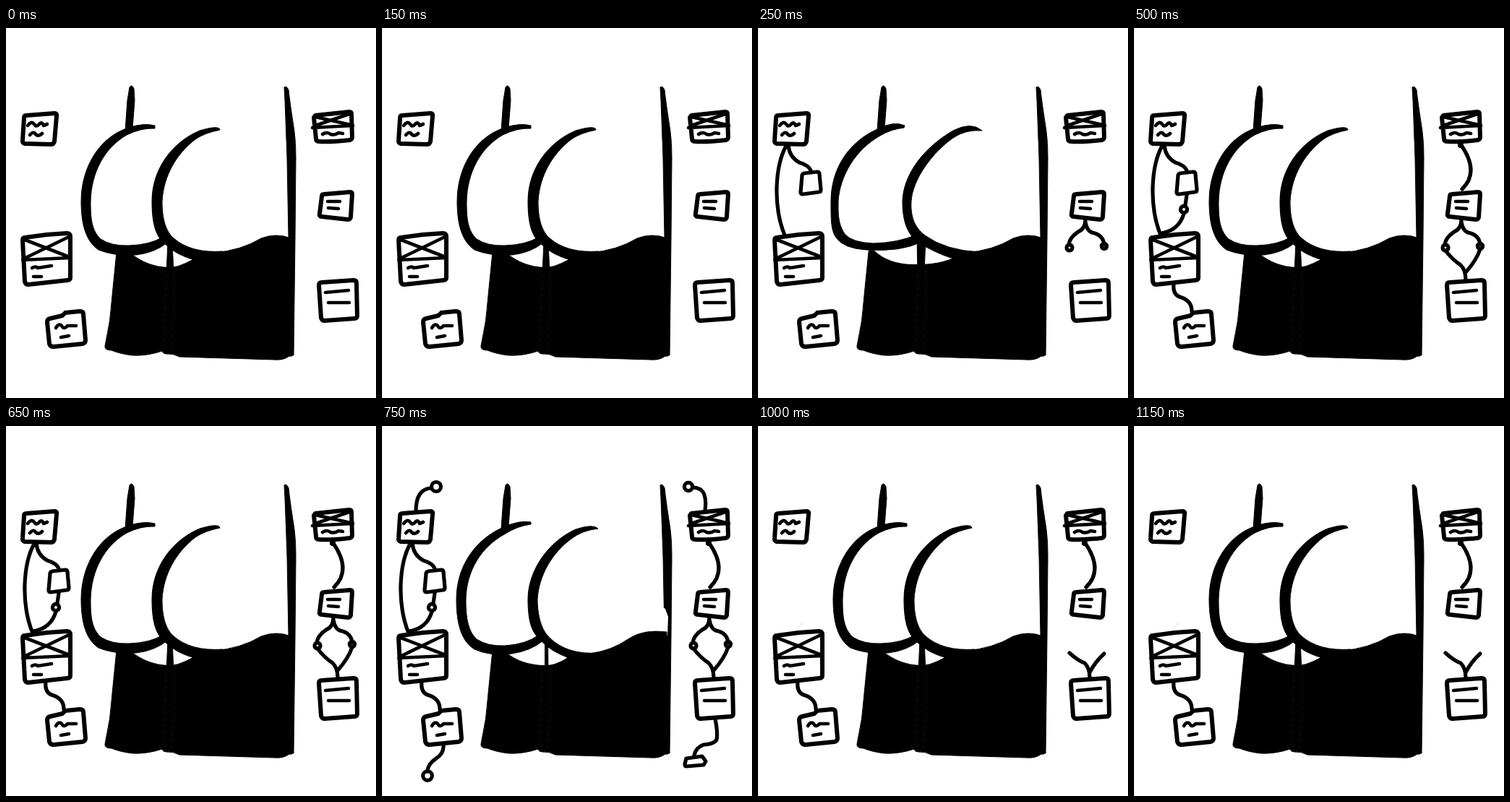
Animation, 512 px wide and 512 px high, one loop 1.25 s. Source, as an HTML page:

```html
<!DOCTYPE html>
<html lang="en">
<head>
<meta charset="utf-8">
<title>Sketch loop</title>
<style>
  html, body { margin: 0; width: 100%; height: 100%; overflow: hidden; background: #fff; }
  svg { display: block; width: 100%; height: 100%; }
  .brush { stroke: #000; stroke-width: 1; stroke-linejoin: round; }
  .gap { fill: #fff; stroke: none; }
  .ink { fill: none; stroke: #000; stroke-width: 5.2; stroke-linecap: round; stroke-linejoin: round; }
  .thin { stroke-width: 4.6; }
  .box { stroke-width: 6; }
</style>
</head>
<body>
<svg viewBox="0 0 512 512">
  <g class="brush">
    <!-- torso and skirt -->
    <path d="M171 82Q174 77 177 84L178 100L175 139L165 142L168 100Z"/>
    <path d="M385 82Q388 79 391 86Q393 104 397 130Q401 152 401 180L400 290L398 453L390 452L391 290L389 180L386 100Z"/>
    <path d="M155 305L180 309L222 294L262 318H398L397 450Q398 455 392 454Q384 460 372 459L240 455Q231 450 222 451Q217 451 216 447Q195 454 175 453Q158 451 146 446Q136 446 137 440Q145 405 147 370Q150 340 153 310Z"/>
    <path d="M221 340L219 446M233 334L232 400L228 446" fill="none" stroke="#222" stroke-width=".6" stroke-dasharray="5 4"/>

    <!-- three poses of the curves -->
    <path data-on="0124" d="M262 320L287 311Q325 308 353 291Q375 283 394 291V320Z"/>
    <g data-on="024">
      <path class="gap" d="M172 311Q195 330 226 331Q240 331 260 319L222 294Z"/>
      <path d="M206 135Q190 131 170 138C130 150 104 192 104 240C104 275 112 296 128 307Q150 316 180 314Q206 311 223 297L217 289Q200 300 170 301Q146 302 131 292C118 280 117 262 117 240C118 200 136 166 167 148Q187 138 206 139Z"/>
      <path d="M296 141Q295 134 268 142C230 158 202 195 202 240C202 270 207 287 218 297Q235 315 265 322L300 317L300 309Q255 312 231 290C218 278 216 255 216 240C218 205 235 175 262 154Q275 145 296 141Z"/>
      <path d="M224 296L230 296L232 340L222 340Z"/>
    </g>
    <g data-on="1">
      <path class="gap" d="M160 307Q180 327 216 327Q247 328 271 318L224 290Z"/>
      <path d="M203 135Q188 128 165 140C125 158 101 195 101 240C101 266 101 280 108 290Q118 305 150 307Q198 310 226 296L219 286Q195 297 160 298Q130 297 120 285C110 270 111 255 111 240C113 205 135 168 169 149Q184 140 202 138Z"/>
      <path d="M310 142Q295 129 270 142C230 165 201 202 200 240C200 268 207 286 222 297Q247 312 270 319L300 318L307 310Q260 308 231 287C215 275 211 258 212 240C214 208 243 171 270 152Q288 140 310 142Z"/>
      <path d="M220 290Q227 283 232 290L230 340L221 340Z"/>
    </g>
    <g data-on="3">
      <path class="gap" d="M388 250L392 253L396 264L395 290L388 290Z"/>
      <path d="M262 322L287 315Q318 311 342 294Q362 281 394 285V320Z"/>
      <path class="gap" d="M170 312Q193 331 226 331Q240 331 256 321L222 294Z"/>
      <path d="M206 133Q190 130 168 140C129 157 103 194 103 240C103 274 110 298 128 309Q150 319 180 315Q206 311 223 297L217 289Q200 302 170 304Q146 305 131 295C118 283 116 262 116 240C117 200 137 168 169 150Q188 138 206 136Z"/>
      <path d="M299 142Q292 135 268 143C230 160 202 200 202 240C202 270 207 285 218 295Q233 313 265 323L300 320V314Q255 317 231 292C218 280 215 255 215 240C217 207 235 176 262 156Q278 144 299 142Z"/>
      <path d="M225.5 296L229.5 296L230 340L225.5 340Z"/>
    </g>
  </g>

  <!-- cards -->
  <g class="ink box">
    <path d="M28 121L67 118Q71 118 70 122L67 157Q66 161 62 161L26 160Q22 159 23 155L25 124Q25 121 28 121Z"/>
    <path d="M26 290L56 286L84 284Q89 284 89 289L89 345Q89 349 85 349L31 355Q27 355 26 351L23 294Q23 290 26 290Z"/>
    <path d="M61 402L78 398L82 394L102 392Q107 392 107 396L110 432Q110 436 106 437L66 441Q61 441 60 437L57 407Q57 403 61 402Z"/>
    <path d="M428 121L475 116Q478 116 478 119L479 151Q479 154 476 155Q450 158 433 157Q429 157 429 153L426 124Z"/>
    <path d="M440 230L476 227Q479 227 479 230L477 262Q476 265 473 265L437 261Q433 261 434 257L437 233Q437 230 440 230Z"/>
    <path d="M437 352L481 349Q485 349 485 353L486 398Q486 402 482 402L441 405Q437 405 436 401L433 356Q433 352 437 352Z"/>
  </g>
  <g class="ink thin">
    <path d="M30 135Q35 128 39 133Q42 138 46 133Q50 129 52 135L57 133M33 148Q38 142 41 147Q45 151 50 146"/>
    <path d="M23 321L89 318M26 293L88 317M87 289L25 319M36 332Q41 329 44 332L63 329M38 344L49 344"/>
    <path d="M69 415Q73 408 77 412Q80 418 85 412L97 412M76 428L87 426"/>
    <path d="M424 138L480 135M428 123L477 134M475 119L428 135M438 147Q444 143 449 147Q455 149 460 145L466 146"/>
    <path d="M445 240L462 240M446 249L460 250"/>
    <path d="M442 366L474 363M446 380L475 380"/>
  </g>

  <!-- connectors -->
  <g class="ink">
    <g data-on="123">
      <path d="M39 163C24 190 20 245 37 287M42 162Q43 178 57 186Q70 190 73 197"/>
      <path d="M64 201L82 199Q85 199 85 202L87 224Q87 227 84 227L62 230Q59 230 59 227L61 204Q61 202 64 201Z"/>
      <path d="M453 265Q453 278 443 282Q431 290 430 300M453 268Q455 283 466 284Q478 288 479 300"/>
      <circle cx="431" cy="304" r="4"/>
      <circle cx="479" cy="302" r="3.6"/>
    </g>
    <g data-on="23">
      <path d="M73 231L71 245M69 257Q62 280 38 284"/>
      <circle cx="69" cy="251" r="4.6"/>
      <path d="M431 308Q440 320 452 328Q459 335 459 348M479 306Q474 321 460 337"/>
    </g>
    <g data-on="234">
      <path d="M55 354Q53 370 66 373Q80 378 80 392"/>
      <path d="M452 161Q479 199 454 223"/>
      <circle cx="452" cy="162" r="1.5"/>
    </g>
    <g data-on="3">
      <path d="M47 117Q47 88 67 86M85 441Q86 453 75 460Q63 468 63 478"/>
      <circle cx="75" cy="84" r="6.5"/>
      <circle cx="63" cy="484" r="6.3"/>
      <path d="M447 117Q450 95 441 88Q436 85 430 85M461 405Q465 425 463 434Q460 440 445 441Q434 445 432 456"/>
      <circle cx="424" cy="84" r="5.6"/>
      <path d="M421 460L443 457L448 464L445 469L421 471Q419 471 419 468Z"/>
    </g>
    <g data-on="4">
      <path d="M431 314Q443 325 452 328Q459 335 459 348M479 315Q466 327 459 341"/>
      <path d="M55 279L62 272" stroke="#ddd" stroke-width="1"/>
    </g>
  </g>
</svg>
<script>
  const STEP = 250, STEPS = 5;
  const parts = document.querySelectorAll('[data-on]');
  const start = performance.now();

  function draw() {
    const elapsed = performance.now() - start;
    const step = Math.floor(elapsed / STEP) % STEPS;
    for (const part of parts) {
      part.style.display = part.dataset.on.includes(step) ? '' : 'none';
    }
    requestAnimationFrame(draw);
  }
  draw();
</script>
</body>
</html>
```
